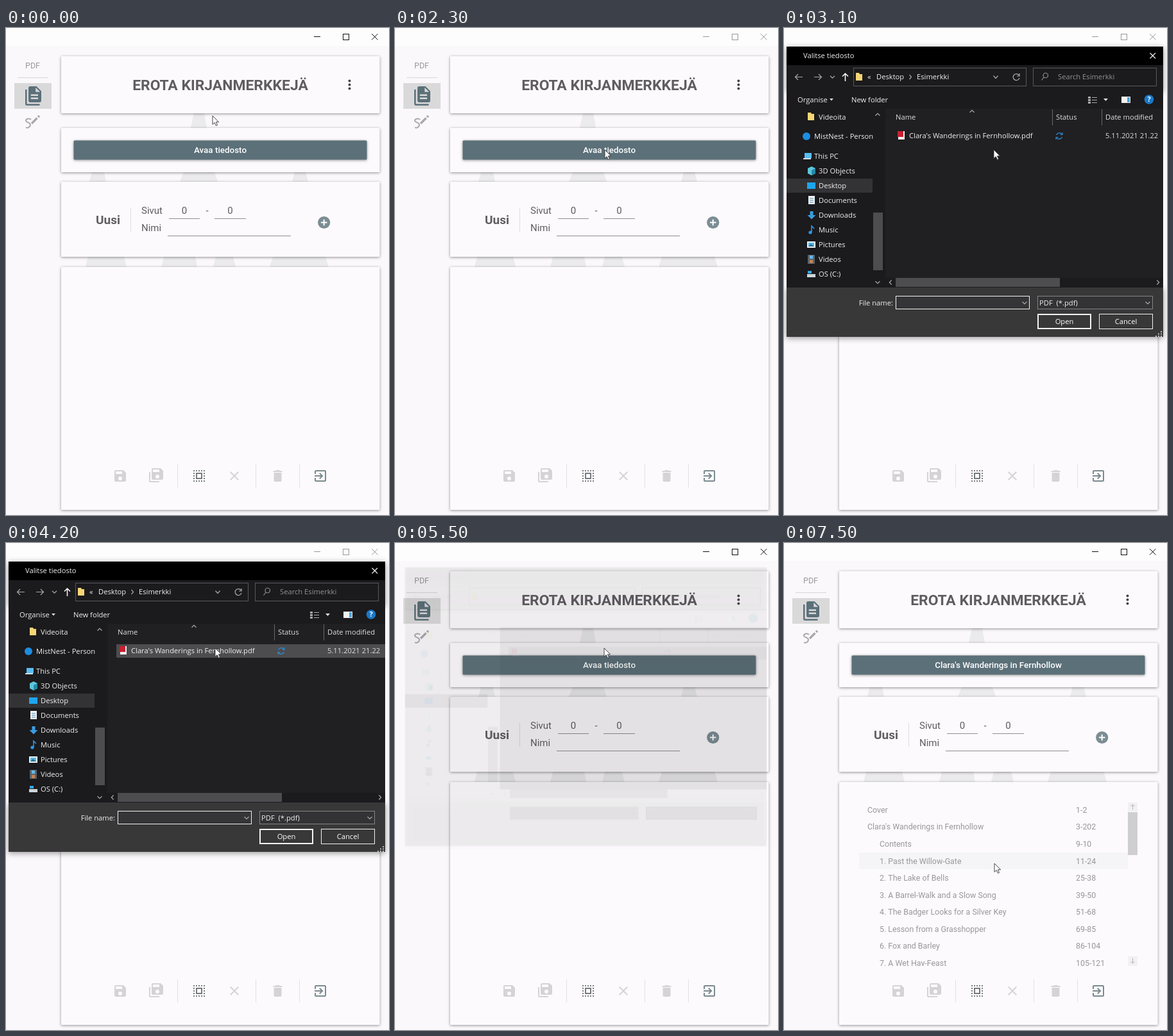
Recreate the animation shown at these times as an HTML page with a canvas. Size 597 by 760 pixels, loop 7.6 s.

```html
<!DOCTYPE html>
<html lang="fi">
<head>
<meta charset="utf-8">
<style>
html, body { margin: 0; width: 100%; height: 100%; overflow: hidden; background: #fbf9fb; }
canvas { display: block; }
</style>
</head>
<body>
<canvas id="stage" width="597" height="760"></canvas>
<script>
const ctx = document.getElementById('stage').getContext('2d');
const LOOP = 7600;
const APP = 'Roboto, sans-serif', SYS = '"Open Sans", "Noto Sans", sans-serif';
const BOOK = "Clara's Wanderings in Fernhollow";
const TEAL = '#5c7079', INK = '#5f5d60', FAINT = '#d5d3d6', BLUE = '#2b8fd9';

const chapters = [
  ['Cover', '1-2'], [BOOK, '3-202'], ['Contents', '9-10'],
  ['1. Past the Willow-Gate', '11-24'], ['2. The Lake of Bells', '25-38'],
  ['3. A Barrel-Walk and a Slow Song', '39-50'],
  ['4. The Badger Looks for a Silver Key', '51-68'],
  ['5. Lesson from a Grasshopper', '69-85'],
  ['6. Fox and Barley', '86-104'], ['7. A Wet Hay-Feast', '105-121']
];

// Icons on a 24 unit grid
const icons = {
  docs: 'M16 0H8C6.9 0 6 .9 6 2V18C6 19.1 6.9 20 8 20H20C21.1 20 22 19.1 22 18V6L16 0M18 16H9V14H18V16M18 12H9V10H18V12M15 7V1.5L20.5 7H15M4 4V22H20V24H4C2.9 24 2 23.1 2 22V4H4Z',
  save: 'M17 3H5c-1.1 0-2 .9-2 2v14c0 1.1.9 2 2 2h14c1.1 0 2-.9 2-2V7zM12 19a3 3 0 1 1 0-6 3 3 0 0 1 0 6zM15 9H5V5h10z',
  saveAll: 'M17 7V3H7V7H17M14 17A3 3 0 0 0 14 11A3 3 0 0 0 14 17M19 1L23 5V17A2 2 0 0 1 21 19H7C5.9 19 5 18.1 5 17V3A2 2 0 0 1 7 1H19M1 7H3V21H17V23H3A2 2 0 0 1 1 21V7Z',
  close: 'M19 6.4L17.6 5 12 10.6 6.4 5 5 6.4 10.6 12 5 17.6 6.4 19 12 13.4 17.6 19 19 17.6 13.4 12z',
  trash: 'M6 19c0 1.1.9 2 2 2h8c1.1 0 2-.9 2-2V7H6zM19 4h-3.5l-1-1h-5l-1 1H5v2h14z',
  exit: 'M10.1 15.6L11.5 17l5-5-5-5-1.4 1.4L12.7 11H3v2h9.7zM19 3H5c-1.1 0-2 .9-2 2v4h2V5h14v14H5v-4H3v4c0 1.1.9 2 2 2h14c1.1 0 2-.9 2-2V5c0-1.1-.9-2-2-2z'
};
const arrow = new Path2D('M0 0V13.5L3.2 10.6L5.4 15.4L7.5 14.4L5.4 9.8H9.6Z');

function rect(x, y, w, h, color) {
  ctx.fillStyle = color;
  ctx.fillRect(x, y, w, h);
}
function box(x, y, w, h, color, width = 1) {
  ctx.strokeStyle = color;
  ctx.lineWidth = width;
  ctx.strokeRect(x + width / 2, y + width / 2, w - width, h - width);
}
function path(d, color, width = 1) {
  ctx.strokeStyle = color;
  ctx.lineWidth = width;
  ctx.stroke(new Path2D(d));
}
function fill(d, color) {
  ctx.fillStyle = color;
  ctx.fill(new Path2D(d), 'evenodd');
}
function dot(x, y, r, color) {
  ctx.fillStyle = color;
  ctx.beginPath();
  ctx.arc(x, y, r, 0, 7);
  ctx.fill();
}
// y is the middle of the capitals
function text(s, x, y, size, color, align = 'left', weight = 400, family = APP) {
  ctx.font = `${weight} ${size}px ${family}`;
  ctx.textAlign = align;
  ctx.fillStyle = color;
  ctx.fillText(s, x, y + size * .357);
}
const sys = (s, x, y, color = '#f0eff0', align) => text(s, x, y, 11.2, color, align, 400, SYS);

function icon(name, cx, cy, color, scale = 1) {
  ctx.save();
  ctx.translate(cx - 12 * scale, cy - 12 * scale);
  ctx.scale(scale, scale);
  fill(icons[name], color);
  ctx.restore();
}
function shadow(blur, y, alpha) {
  ctx.shadowBlur = blur;
  ctx.shadowOffsetY = y;
  ctx.shadowColor = `rgba(0,0,0,${alpha})`;
}
function raised(x, y, w, h, color) {
  ctx.save();
  shadow(4, 1, .42);
  ctx.fillStyle = color;
  ctx.beginPath();
  ctx.roundRect(x, y, w, h, 1.5);
  ctx.fill();
  ctx.restore();
}

function windowButtons(active) {
  const c = active ? '#111' : '#99979a';
  rect(480, 13, 10, 1, c);
  box(525, 9, 10, 10, c);
  path('M570 9L579.5 18.5M579.5 9L570 18.5', c);
}

function sidebar() {
  text('PDF', 41.5, 59, 12.5, '#9b999c', 'center');
  rect(18, 77, 48, 1, '#d8d6d9');
  rect(13, 86, 58, 40, '#dad9da');
  icon('docs', 42.5, 106, TEAL, 1.25);
  path('M39 143C36 140 30 142 31 145C32 148 38 147 38 151C38 154 34 157 31 155', '#aaa8ab', 2);
  path('M40 149L48.5 140.5', '#aaa8ab', 3.4);
  path('M50 139L52 137', '#aaa8ab', 3.4);
}

function list(cursorY) {
  const top = 416.5, step = 26.53;
  const hover = Math.round((cursorY - top) / step);
  ctx.save();
  ctx.beginPath();
  ctx.rect(110, 400, 450, 260);
  ctx.clip();
  chapters.forEach(([name, pages], i) => {
    const y = top + i * step;
    if (i === hover) rect(117, y - 13, 419, 26, '#f5f4f6');
    text(name, i < 2 ? 130 : 149, y, 12.4, '#999799');
    text(pages, 455, y, 12.4, '#999799');
  });
  rect(536, 405, 15, 14, '#f1f0f2');
  rect(536, 420, 15, 67, '#cfced0');
  rect(536, 645, 15, 15, '#f1f0f2');
  path('M543.5 416V408M540.5 411L543.5 408L546.5 411M543.5 648V656M540.5 653L543.5 656L546.5 653', '#b5b3b6');
  ctx.restore();
}

function app(active, loaded, cursorY) {
  rect(0, 0, 597, 760, '#faf8fa');
  rect(0, 0, 597, 28, '#fefdfe');
  windowButtons(active);
  sidebar();
  // Pale backdrop shapes seen between the cards
  fill('M293 133H309L313 156H288ZM134 225H153L156 240H130ZM277 225H325L330 240H271ZM450 225H467L471 240H446ZM128 357H184L188 373H124ZM246 357H295L298 373H242ZM327 357H354L358 373H323ZM416 357H498L503 373H411Z', '#ebeaec');
  for (const [y, h] of [[44, 89], [156, 69], [240, 117], [373, 379]]) raised(86, y, 496.5, h, '#fcfafc');

  text('EROTA KIRJANMERKKEJÄ', 334, 89, 22.9, INK, 'center', 700);
  for (const y of [82.5, 88.5, 94.5]) dot(535.5, y, 2, '#454346');
  raised(105.5, 175.5, 457, 30, TEAL);
  text(loaded ? BOOK : 'Avaa tiedosto', 334, 190.5, 13.4, '#fff', 'center', 500);

  text('Uusi', 159, 299, 19, INK, 'center', 700);
  rect(194, 281, 1, 37, '#dddbde');
  text('Sivut', 211, 285, 15, INK);
  text('Nimi', 211, 312, 15, INK);
  text('0', 278, 285, 15, INK, 'center');
  text('-', 313.5, 285, 15, INK, 'center');
  text('0', 349.5, 285, 15, INK, 'center');
  rect(254, 297, 48, 1, '#908e91');
  rect(325, 297, 49, 1, '#908e91');
  rect(252, 324, 192, 1, '#908e91');
  dot(495.7, 303.5, 9.6, '#7b8d94');
  path('M491 303.5H500.5M495.7 298.7V308.3', '#fff', 2);

  if (loaded) list(cursorY);
  icon('save', 178, 699, FAINT);
  icon('saveAll', 234, 698, FAINT);
  // Dotted selection frame
  for (let i = 0; i < 5; i++) {
    const p = i * 4;
    for (const [x, y] of [[p, 0], [p, 16], [0, p], [16, p]]) rect(292 + x, 690 + y, 2, 2, '#777b80');
  }
  box(296, 694, 10, 10, '#777b80', 2);
  icon('close', 356, 699, FAINT);
  icon('trash', 423.5, 699, FAINT);
  icon('exit', 490, 699, '#7b8a90');
  for (const x of [267, 389, 457]) rect(x, 681, 1, 36, '#e3e1e4');
}

function chevron(x, y, dx, dy, color = '#aaa') {
  const a = dx ? `M${x - dx} ${y - 3.5}L${x + dx} ${y}L${x - dx} ${y + 3.5}`
               : `M${x - 3.5} ${y - dy}L${x} ${y + dy}L${x + 3.5} ${y - dy}`;
  path(a, color, 1.2);
}
function folder(x, y) {
  fill(`M${x - 5} ${y - 6}h5l1 2h4v10h-10z`, '#f5d675');
}
function picture(x, y) {
  rect(x - 7, y - 5, 13, 10, '#e8f2f8');
  rect(x - 5, y - 3, 9, 6, '#57b5e8');
  fill(`M${x - 5} ${y + 3}l4 -4l5 4z`, '#2d6f8f');
}
function film(x, y) {
  rect(x - 6, y - 7, 11, 14, '#59636e');
  rect(x - 3, y - 6, 5, 5, '#69b7e5');
  rect(x - 3, y + 1, 5, 5, '#c78254');
}
function download(x, y) {
  fill(`M${x - 2.5} ${y - 6}h5v6h4l-6.5 6.5l-6.5 -6.5h4z`, '#3c9be0');
}
function paneIcon() {
  rect(526, 107, 14, 10, '#f2f2f2');
  rect(535, 108, 4, 8, '#4aa5dd');
}

const tree = [['3D Objects', 223], ['Desktop', 246], ['Documents', 269], ['Downloads', 292],
  ['Music', 315], ['Pictures', 338], ['Videos', 361], ['OS (C:)', 384]];

function treeIcons() {
  dot(35, 169, 6, '#1e8de0');
  rect(32, 195, 11, 8, '#59bdf0');
  rect(30, 203, 12, 2, '#cfdde5');
  fill('M43 216l6 3v8l-6 3l-6 -3v-8z', '#5cc6dc');
  fill('M43 222l6 -3v8l-6 3z', '#2589a5');
  rect(36, 241, 13, 10, '#1ea5ef');
  rect(38, 262, 10, 13, '#eef2f5');
  path('M40 266H46M40 269H46M40 272H46', '#5590b5');
  dot(41, 319, 2.6, '#2d97ea');
  path('M43 319V309L47 313', '#2d97ea', 1.6);
  rect(36, 384, 13, 5, '#cdd5da');
  rect(37, 379, 6, 4, '#37a8e8');
}

function toolbar() {
  path('M29 76.5H18M22 72L17.5 76.5L22 81', '#aaa', 1.2);
  path('M47 76.5H58M54 72L58.5 76.5L54 81', '#aaa', 1.2);
  chevron(75.5, 76.5, 0, 1.7);
  path('M95.5 83V71M91 75.5L95.5 71L100 75.5', '#fff', 1.5);
  box(108, 62, 270, 29, '#59585a');
  folder(117, 76);
  sys('«', 130, 76);
  sys('Desktop', 144, 76.5);
  chevron(197, 76.5, 1.5, 0);
  sys('Esimerkki', 207, 76.5);
  chevron(330, 76.5, 0, 2);
  path('M366.5 74A5 5 0 1 0 367 78M367 71V75H363', '#aaa', 1.2);
  box(388, 62, 193, 29, '#59585a');
  path('M411.5 74A3.7 3.7 0 1 1 404 74A3.7 3.7 0 1 1 411.5 74M405 77L401.5 81.5', '#929193', 1.2);
  sys('Search Esimerkki', 427, 76.5, '#929193');
  sys('Organise', 21, 112);
  fill('M71 110H77L74 113.5Z', '#ddd');
  sys('New folder', 105, 112);
  for (const y of [107, 111, 115]) {
    rect(474, y, 4, 3, '#aaa');
    rect(480, y + 1, 8, 1, '#aaa');
  }
  fill('M498 110H505L501.5 114Z', '#ddd');
}

// The form fields are blank while the window is still opening
function form(ghost, fileName) {
  const fields = [[174, 418, 209, 21, 1], [395, 418, 180, 21, 1], [395, 446, 84, 24, 2], [491, 446, 84, 24, 1]];
  if (ghost) {
    rect(118, 421, 52, 15, '#fff');
    for (const [x, y, w, h] of fields) rect(x, y, w, h, '#fff');
    rect(576, 466, 15, 16, '#fff');
    return;
  }
  rect(174, 418, 209, 21, '#353436');
  rect(395, 418, 180, 21, '#333234');
  for (const [x, y, w, h, b] of fields) box(x, y, w, h, y < 440 && x > 300 ? '#858486' : '#f4f3f4', b);
  sys('File name:', 170, 429, '#eee', 'right');
  if (fileName) {
    ctx.save();
    ctx.beginPath();
    ctx.rect(175, 418, 191, 21);
    ctx.clip();
    sys(BOOK + '.pdf', 177, 429);
    ctx.restore();
  }
  chevron(375, 429, 0, 1.7);
  sys('PDF  (*.pdf)', 398, 429);
  chevron(567, 429, 0, 1.7);
  sys('Open', 437, 458, '#fff', 'center');
  sys('Cancel', 533, 458, '#fff', 'center');
  for (let i = 0; i < 3; i++)
    for (let j = 0; j <= i; j++) rect(587 - j * 4, 473 + i * 3.5, 2, 2, '#bbb');
}

function dialog({ ghost, scale, alpha, hover, selected }) {
  ctx.save();
  ctx.globalAlpha = alpha;
  ctx.translate(297.5, 255.5);
  ctx.scale(scale, scale);
  ctx.translate(-297.5, -255.5);

  ctx.save();
  shadow(ghost ? 4 : 9, 2, .4);
  rect(4, 29, 587, 29, ghost ? '#302e31' : '#000');
  rect(4, 58, 587, 40, ghost ? 'rgba(255,255,255,.75)' : '#1b1a1c');
  rect(4, 405, 587, 77, ghost ? '#5b595c' : '#393839');
  ctx.restore();
  rect(4, 97, 587, 308, ghost ? 'rgba(30,28,30,.8)' : '#1b1a1c');
  if (!ghost) rect(158, 126, 433, 264, '#201f21');
  sys('Valitse tiedosto', 30, 43.5);
  path('M570.5 39L579 47.5M579 39L570.5 47.5', '#eee', 1.2);
  if (!ghost) toolbar();
  paneIcon();
  dot(569, 111.5, 7.3, '#1979c9');
  text('?', 569, 111.5, 11, '#fff', 'center', 700, SYS);

  // Folder tree
  rect(4, 235, 134, 22, ghost ? '#605e61' : '#333234');
  folder(42, 138);
  sys('Videoita', 54, 139);
  sys('MistNest - Person', 47, 169.5);
  sys('This PC', 47, 200.5);
  for (const [name, y] of tree) sys(name, 54, y + .5);
  if (ghost) rect(37, 378, 9, 12, '#f2f2f2');
  else treeIcons();
  download(43, 292);
  picture(43, 338);
  film(43, 361);
  const bar = ghost ? '#727073' : '#4d4c4e';
  rect(139, 288, 15, 90, bar);
  rect(174, 390, 256, 14, bar);
  chevron(146, 135, 0, -1.7);
  chevron(146, 397, 0, 1.7);
  chevron(166, 397, -1.7, 0);
  chevron(583, 397, 1.7, 0);

  // File table
  chevron(293, 130, 0, -1.7);
  for (const x of [418, 495]) rect(x, 127, 1, 25, '#69686a');
  sys('Name', 174, 139.5, '#dedde0');
  sys('Status', 424, 139.5, '#dedde0');
  sys('Date modified', 501, 139.5, '#dedde0');
  if (selected || hover) rect(172, 158, 419, 21, selected ? '#777678' : '#4d4c4e');
  rect(178, 161, 10, 13, '#f4f2f3');
  if (!ghost) rect(177, 161, 9, 9, '#c8202f');
  sys(BOOK + '.pdf', 195, 168.5);
  if (!ghost) path('M424.5 167A5 5 0 0 1 433 165.5M434 163V166.5H430.5M433.5 170A5 5 0 0 1 425 171.5M424 174V170.5H427.5', BLUE, 1.2);
  sys('5.11.2021 21.22', 501, 168.5, '#dedde0');
  form(ghost, selected);
  ctx.restore();
}

// Cursor stops: time, x, y
const stops = [[0, 322, 137], [900, 322, 137], [1700, 327, 190], [3400, 327, 190],
  [4200, 326, 164], [6400, 326, 164], [7200, 328, 512], [7450, 328, 500], [LOOP, 328, 500]];

function cursorAt(t) {
  const i = stops.findIndex(s => s[0] > t);
  const [t0, x0, y0] = stops[i - 1], [t1, x1, y1] = stops[i];
  const p = (t - t0) / (t1 - t0), e = p * p * (3 - 2 * p);
  return [x0 + (x1 - x0) * e, y0 + (y1 - y0) * e];
}

function draw(t) {
  const [x, y] = cursorAt(t);
  app(t < 2200 || t >= 5380, t >= 6100, y);
  if (t >= 2450 && t < 5510) {
    const ghost = t < 2580;
    const out = Math.max(0, (t - 5350) / 160);
    dialog({
      ghost,
      scale: ghost ? .987 : 1 - .042 * out,
      alpha: 1 - out,
      hover: t > 3400 && y < 179,
      selected: t >= 4900
    });
  }
  ctx.save();
  ctx.translate(x, y);
  ctx.fillStyle = '#fff';
  ctx.fill(arrow);
  ctx.strokeStyle = '#333';
  ctx.lineWidth = .9;
  ctx.stroke(arrow);
  ctx.restore();
}

const start = performance.now();
function tick() {
  draw((performance.now() - start) % LOOP);
  requestAnimationFrame(tick);
}
tick();
</script>
</body>
</html>
```
